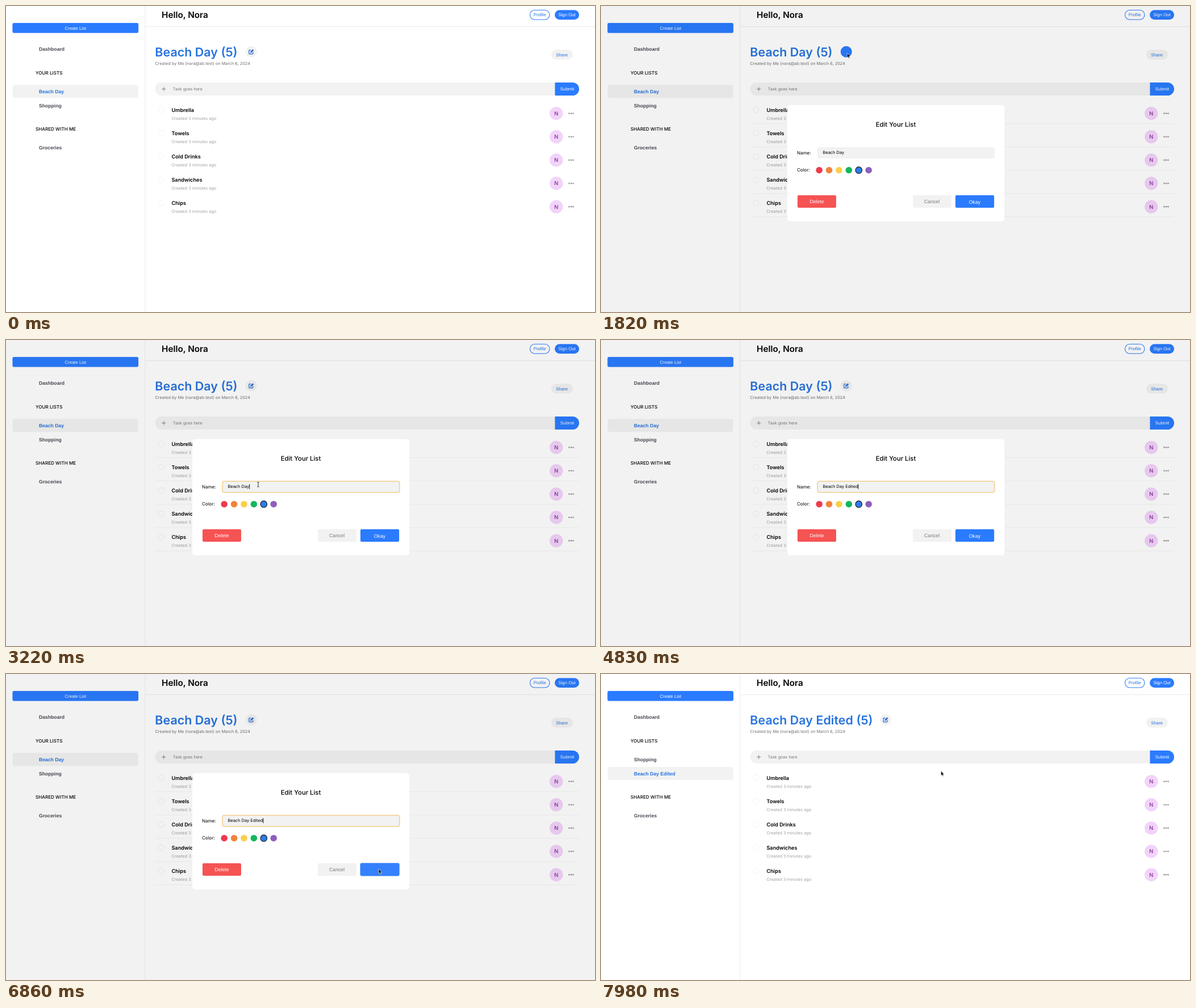
An HTML page that plays this animation: 1037x540 px, repeating every 8000 ms.

```html
<!DOCTYPE html>
<html lang="en">
<head>
<meta charset="utf-8">
<title>Edit a list</title>
<style>
  html, body { margin: 0; width: 100%; height: 100%; overflow: hidden; background: #fff; }
  svg { display: block; width: 100vw; height: 100vh; }
  text { font-family: Inter, "Open Sans", sans-serif; white-space: pre; text-rendering: geometricPrecision; }
  .ui { font-family: "Liberation Sans", Arial, sans-serif; }
</style>
</head>
<body>
<svg id="stage" viewBox="0 0 1037 540" preserveAspectRatio="none"></svg>
<script>
const LOOP = 8000;
const OPEN = 1750, FOCUS = 2870, CLOSE = 7140;
const BLUE = '#2a7bfe', LINK = '#2673de', GREY = '#f2f2f2', INK = '#464953';
const svg = document.getElementById('stage');

function add(parent, tag, attrs, content) {
  const node = document.createElementNS('http://www.w3.org/2000/svg', tag);
  for (const key in attrs) node.setAttribute(key, attrs[key]);
  if (content !== undefined) node.textContent = content;
  parent.appendChild(node);
  return node;
}
const group = (parent, attrs = {}) => add(parent, 'g', attrs);
const box = (parent, x, y, width, height, rx, fill, more = {}) =>
  add(parent, 'rect', { x, y, width, height, rx, fill, ...more });
const dot = (parent, cx, cy, r, fill, more = {}) =>
  add(parent, 'circle', { cx, cy, r, fill, ...more });
const line = (parent, d, stroke, more = {}) =>
  add(parent, 'path', { d, stroke, fill: 'none', ...more });
const label = (parent, text, x, y, size, fill, more = {}) =>
  add(parent, 'text', { x, y, 'font-size': size, fill, ...more }, text);
const centred = (parent, text, x, y, size, fill, more = {}) =>
  label(parent, text, x, y, size, fill, { 'text-anchor': 'middle', class: 'ui', ...more });
const show = (node, on) => node.setAttribute('visibility', on ? 'visible' : 'hidden');

// Page
const page = group(svg);
const glow = { stroke: BLUE, 'stroke-opacity': .2, 'stroke-width': 1, 'paint-order': 'stroke' };
line(page, 'M245 0V540M245 36.5H1037', '#ebebeb');
label(page, 'Hello, Nora', 274, 20.8, 15.3, '#000', { 'font-weight': 600 });
box(page, 11.5, 30, 221.5, 17.5, 2.5, BLUE, glow);
centred(page, 'Create List', 122.3, 41.7, 7.8, '#fff');
box(page, 922.6, 7.2, 34.4, 16.8, 8.4, '#fff', { stroke: BLUE, 'stroke-width': 1.1 });
centred(page, 'Profile', 939.8, 18.4, 7.8, LINK);
box(page, 966.2, 7.2, 42.8, 16.8, 8.4, BLUE, glow);
centred(page, 'Sign Out', 987.6, 18.4, 7.8, '#fff');

const menu = (text, y, fill = INK) =>
  label(page, text, 58, y, 8.65, fill, { class: 'ui', 'font-weight': 700 });
const marker = box(page, 11.7, 139.2, 221, 23, 4, GREY);
menu('Dashboard', 79.4);
const activeItem = menu('Beach Day', 153.6, LINK);
const otherItem = menu('Shopping', 178.5);
menu('Groceries', 252.7);
for (const [text, y] of [['YOUR LISTS', 120.9], ['SHARED WITH ME', 219.9]])
  label(page, text, 52, y, 8.1, '#000', { 'font-weight': 500 });

const title = label(page, '', 262.3, 88.6, 21.5, LINK, { 'font-weight': 600 });
label(page, 'Created by Me (nora@ab.test) on March 6, 2024', 262.5, 103.8, 7.3, '#707070');
const edit = group(page);
dot(edit, 0, 0, 10, GREY);
const editHover = dot(edit, 0, 0, 10, BLUE);
const pencil = group(edit, { stroke: '#2468d4', 'stroke-width': 1.2, fill: 'none', 'stroke-linejoin': 'round' });
add(pencil, 'path', { d: 'M-.4 -3.1H-3.1Q-4 -3.1 -4 -2.2V3.1Q-4 4 -3.1 4H2.2Q3.1 4 3.1 3.1V.6' });
add(pencil, 'path', { d: 'M-1.5 1.6L-1.1 -.3L2.6 -4L4.2 -2.4L.5 1.3Z', fill: '#2468d4', 'stroke-width': .6 });

box(page, 960, 77, 38, 17.6, 8.8, GREY);
centred(page, 'Share', 978.7, 88.5, 7.8, LINK);
box(page, 262.5, 135, 746.5, 23, 11.5, GREY);
line(page, 'M274.3 146.5H281.3M277.8 143V150', '#777', { 'stroke-width': .9 });
label(page, 'Task goes here', 293.8, 149, 7.2, '#777');
add(page, 'path', { d: 'M966.5 135H997.5A11.5 11.5 0 0 1 997.5 158H966.5Z', fill: BLUE });
centred(page, 'Submit', 988, 149.2, 7.8, '#fff');

const faint = group(page, { fill: 'none' });
const rules = group(page);
['Umbrella', 'Towels', 'Cold Drinks', 'Sandwiches', 'Chips'].forEach((task, i) => {
  const y = 183.2 + i * 41.15;
  dot(faint, 273, y, 5, 'none');
  add(rules, 'path', { d: `M262.5 ${y + 24.4}H1009` });
  label(page, task, 291.4, y + 3.3, 9.2, '#000', { 'font-weight': 600 });
  label(page, 'Created 3 minutes ago', 291.5, y + 17.4, 7.35, '#a3a3a3');
  dot(page, 968.8, y + 6.4, 11.7, '#f2d3fa');
  label(page, 'N', 968.8, y + 9.8, 9.4, '#7d2b92', { 'text-anchor': 'middle', 'font-weight': 500 });
  for (const x of [991.5, 995, 998.5]) dot(page, x, y + 6.4, 1.35, '#9a9a9a');
});

// Dialog
const dialog = group(svg);
box(dialog, 0, 0, 1037, 540, 0, '#000', { opacity: .052 });
box(dialog, 328, 175, 382.3, 205, 5, '#fff');
label(dialog, 'Edit Your List', 519, 213, 11.3, '#000', { 'text-anchor': 'middle', 'font-weight': 500 });
label(dialog, 'Name:', 345, 261.5, 8, '#000');
label(dialog, 'Color:', 345, 292.3, 8, '#000');
const field = box(dialog, 381, 249.2, 312, 19.8, 3, GREY);
const nameText = label(dialog, '', 390.4, 261.4, 7.45, '#000');
const caret = line(dialog, 'M0 254.3V263.2', '#000', { 'stroke-width': .9 });
['#ee3a50', '#f0843a', '#fbcf48', '#12b75c', '#2b7de9', '#8d5fbd'].forEach((fill, i) =>
  dot(dialog, 384.2 + i * 17.4, 289.7, 5.8, fill, i === 4 ? { stroke: '#111', 'stroke-width': 1.1 } : {}));
box(dialog, 346, 334, 68, 22, 2, '#f65353');
centred(dialog, 'Delete', 380, 347.7, 8.7, '#fff');
box(dialog, 549, 334, 68, 22, 2, GREY);
centred(dialog, 'Cancel', 582.6, 347.7, 8.7, '#777');
const okay = box(dialog, 624, 334, 68.2, 22, 2, BLUE);
const okayText = centred(dialog, 'Okay', 658, 348.7, 8.8, '#fff');

// Pointers
const arrow = add(svg, 'path', {
  d: 'M0 0V8.4L1.9 6.7L3.2 9.5L4.6 8.9L3.4 6.1H5.9Z',
  fill: '#111', stroke: '#fff', 'stroke-width': .6
});
const beam = line(svg, 'M-1.8 -4.2Q0 -4.2 0 -3Q0 -4.2 1.8 -4.2M0 -3V3M-1.8 4.2Q0 4.2 0 3Q0 4.2 1.8 4.2',
  '#222', { 'stroke-width': .9 });

const PATH = [ // time, x, y
  [70, 560, 545], [840, 437, 100], [1100, 433, 84], [1890, 433.3, 83], [2450, 458, 278],
  [2800, 446, 257], [3080, 444, 255], [5250, 444, 255], [5600, 478, 280], [6020, 531, 314],
  [6370, 637, 339], [6650, 656, 344], [7140, 656.2, 344], [7910, 599, 171.5], [LOOP, 598.4, 171]
];
const KEYS = [[3640, ' '], [3920, 'E'], [4130, 'd'], [4340, 'it'], [4410, 'e'], [4620, 'd']];

const clamp = v => Math.max(0, Math.min(1, v));
const ramp = (t, from, length) => clamp((t - from) / length);

function pointerAt(t) {
  const i = Math.max(1, PATH.findIndex(p => p[0] >= t));
  const [t0, x0, y0] = PATH[i - 1], [t1, x1, y1] = PATH[i];
  const k = ramp(t, t0, t1 - t0);
  const e = k * k * (3 - 2 * k);
  return [x0 + (x1 - x0) * e, y0 + (y1 - y0) * e];
}

function draw(t) {
  const open = t >= OPEN && t < CLOSE;
  const saved = t >= CLOSE;
  const name = saved ? 'Beach Day Edited' : 'Beach Day';

  title.textContent = name + ' (5)';
  activeItem.textContent = name;
  activeItem.setAttribute('y', saved ? 178.5 : 153.6);
  otherItem.setAttribute('y', saved ? 153.6 : 178.5);
  marker.setAttribute('y', saved ? 164.1 : 139.2);
  edit.setAttribute('transform', `translate(${saved ? 501 : 431.8} 80.7)`);
  faint.setAttribute('stroke', open ? '#efefef' : '#f5f5f5');
  rules.setAttribute('stroke', open ? '#f3f3f3' : '#fefefe');

  const editLit = ramp(t, 1000, 250) * (1 - ramp(t, 1960, 250));
  editHover.setAttribute('opacity', editLit);
  pencil.setAttribute('opacity', 1 - editLit);

  dialog.setAttribute('display', open ? 'inline' : 'none');
  show(caret, false);
  if (open) {
    const focused = t >= FOCUS;
    field.setAttribute('stroke', focused ? '#f0b95a' : 'none');
    nameText.textContent = 'Beach Day' + KEYS.filter(k => t >= k[0]).map(k => k[1]).join('');
    caret.setAttribute('transform', `translate(${390.9 + nameText.getComputedTextLength()} 0)`);
    show(caret, focused && (t < 5250 || Math.floor((t - 5250) / 530) % 2 === 1));

    const lit = ramp(t, 6160, 150);
    okay.setAttribute('fill', lit ? '#3580fc' : BLUE);
    okay.setAttribute('stroke', lit ? '#3580fc' : 'none');
    okayText.setAttribute('opacity', 1 - lit);
  }

  const [x, y] = pointerAt(t);
  const visible = t >= 70 && (t < 3430 || t >= 5250);
  const overField = open && x > 381 && x < 693 && y > 249 && y < 269;
  arrow.setAttribute('transform', `translate(${x} ${y})`);
  beam.setAttribute('transform', `translate(${x} ${y})`);
  show(arrow, visible && !overField);
  show(beam, visible && overField);
}

const start = performance.now();
function tick() {
  draw((performance.now() - start) % LOOP);
  requestAnimationFrame(tick);
}
tick();
</script>
</body>
</html>
```
